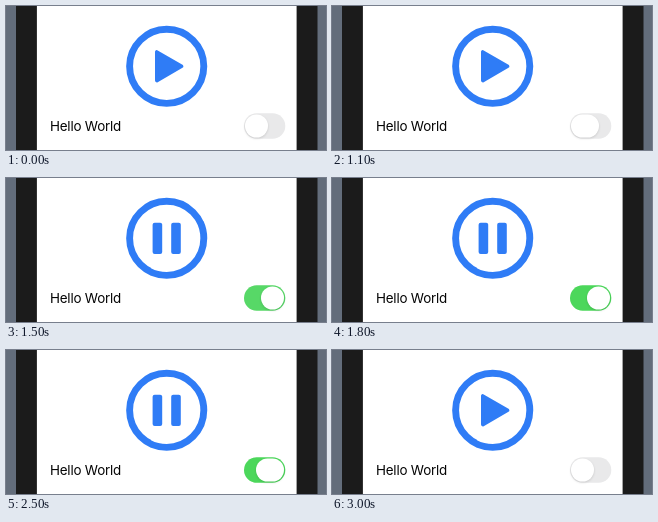
These frames come from a looping animation (320 px wide and 144 px high, 4400 ms). An HTML page:

```html
<!DOCTYPE html>
<html lang="en">
<head>
<meta charset="utf-8">
<title>Play toggle</title>
<style>
  html, body { margin: 0; width: 100%; height: 100%; overflow: hidden; }
  svg { display: block; width: 100%; height: 100%; background: #636d7b; }
  .accent { fill: #2f7cf6; stroke: #2f7cf6; }
  .label { font: 13.4px Inter, "Liberation Sans", sans-serif; letter-spacing: -.2px; fill: #050505; }
  .knob { fill: #fff; filter: drop-shadow(0 1px 1px #0002); }

  /* The screen updates every 100 ms, so poses are held rather than blended. */
  .knob, .track, .play, .pause { animation: 4.4s step-end infinite; }
  .knob { animation-name: slide; }
  .track { animation-name: tint; }
  .play { animation-name: hide; }
  .pause { animation-name: show; }

  @keyframes slide {
    0% { x: 239px; width: 23px; }
    20.45% { x: 239px; width: 24.5px; }
    22.72% { x: 239px; width: 26.5px; }
    25% { x: 239px; width: 28px; }
    27.27% { x: 246px; width: 28px; }
    29.54% { x: 255px; width: 23px; }
    47.72% { x: 254.7px; width: 23.3px; }
    50% { x: 254.5px; width: 23.5px; }
    52.27% { x: 252px; width: 26px; }
    54.54% { x: 250px; width: 28px; }
    59.09% { x: 248px; width: 28px; }
    61.36% { x: 241.3px; width: 28px; }
    63.63% { x: 239px; width: 25px; }
    65.9%, 100% { x: 239px; width: 23px; }
  }
  @keyframes tint {
    0% { fill: #e9e9ea; }
    27.27% { fill: #d2e8d5; }
    29.54% { fill: #9fdfa6; }
    31.81% { fill: #74d981; }
    34.09% { fill: #57d867; }
    36.36% { fill: #4fd75f; }
    38.63% { fill: #4cd75b; }
    59.09% { fill: #6fd87c; }
    61.36% { fill: #a5e0ad; }
    63.63% { fill: #cfe7d2; }
    65.9% { fill: #e3e9e4; }
    68.18%, 100% { fill: #e9e9ea; }
  }
  @keyframes hide {
    0%, 63.63%, 100% { visibility: visible; }
    29.54% { visibility: hidden; }
  }
  @keyframes show {
    0%, 63.63%, 100% { visibility: hidden; }
    29.54% { visibility: visible; }
  }
</style>
</head>
<body>
<svg viewBox="0 0 320 144">
  <rect x="10" width="301.5" height="144" fill="#1b1b1b"/>
  <rect x="30.9" width="259.7" height="144" fill="#fff"/>
  <g class="accent">
    <circle cx="160.7" cy="60.3" r="37.1" fill="none" stroke-width="6.9"/>
    <path class="play" d="M150.8 46V74.6L175.6 60.3Z" stroke-width="3.6" stroke-linejoin="round"/>
    <g class="pause" stroke="none">
      <rect x="146.6" y="44.8" width="9.6" height="31.1" rx="2"/>
      <rect x="165.2" y="44.8" width="9.6" height="31.1" rx="2"/>
    </g>
  </g>
  <text class="label" x="44" y="124.7">Hello World</text>
  <rect class="track" x="238" y="107.3" width="41.3" height="25.4" rx="12.7"/>
  <rect class="knob" x="239" y="108.5" width="23" height="23" rx="11.5"/>
</svg>
</body>
</html>
```
